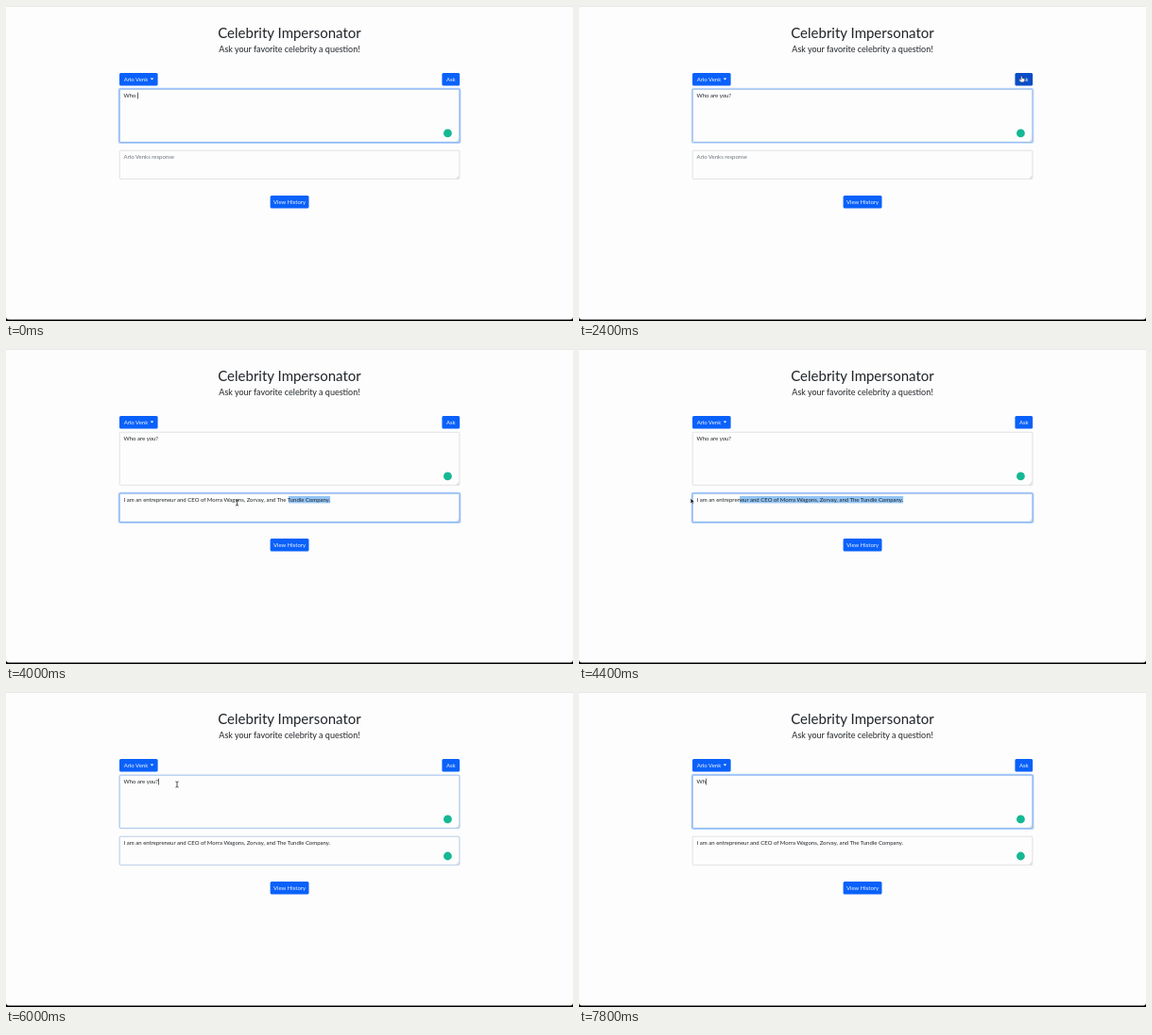
Write an HTML page that moves like this. It is 600x334 px and loops after 8 s.

```html
<!DOCTYPE html>
<html lang="en">
<head>
<meta charset="utf-8">
<title>Celebrity Impersonator</title>
<style>
  html, body { margin: 0; width: 100%; height: 100%; overflow: hidden; background: #000; }
  svg { display: block; width: 100vw; height: 100vh; }
  text { font: 6px Lato, "Open Sans", sans-serif; fill: #212529; white-space: pre; }
  .middle { text-anchor: middle; }
  .title { font-size: 15px; }
  .subtitle { font-size: 9px; }
  .button rect { fill: #0a61fa; }
  .button text { fill: #f1f6ff; }
  .button.dark rect { fill: #0a4dc6; }
  .box { fill: #fdfdfd; stroke: #cbcfd4; stroke-width: .6; }
  .ring { fill: none; stroke: #0d6efd; stroke-opacity: .32; stroke-width: 1.6; }
  .edge { fill: none; stroke: #7fb2f5; stroke-width: .7; }
  .grip { stroke: #999; stroke-width: .4; }
  .badge { fill: #15b894; }
</style>
</head>
<body>
<svg viewBox="0 0 600 334">
  <rect width="600" height="334"/>
  <rect y="-5" width="600" height="337.6" rx="3" fill="#fdfdfd"/>
  <rect width="600" height="1" fill="#e9e9e9"/>

  <text class="title middle" x="300" y="34.2">Celebrity Impersonator</text>
  <text class="subtitle middle" x="300" y="48.6">Ask your favorite celebrity a question!</text>

  <g class="button">
    <rect x="120" y="71" width="40.6" height="13.4" rx="1.5"/>
    <text x="124.7" y="79.7">Arlo Venk</text>
    <path d="M152.7 76.5h3.6l-1.8 1.9z" fill="#fff"/>
  </g>
  <g class="button" id="ask">
    <rect x="461.4" y="71" width="18.7" height="13.4" rx="1.5"/>
    <text class="middle" x="470.8" y="79.7">Ask</text>
  </g>
  <rect class="ring" id="askRing" x="460.7" y="70.3" width="20.1" height="14.8" rx="2"/>
  <g class="button">
    <rect x="279.6" y="201" width="40.9" height="13.4" rx="1.5"/>
    <text class="middle" x="300" y="209.8">View History</text>
  </g>

  <g id="fields"></g>
  <rect id="selection" y="156" height="7.4" fill="#93c4f4"/>
  <text id="question" x="124.6" y="97"></text>
  <text id="response" x="124.6" y="161.9"></text>
  <rect id="caret" y="91.7" width=".6" height="6.8"/>
  <circle class="badge" cx="467.4" cy="134.9" r="4.4"/>
  <circle class="badge" id="replyBadge" cx="467.4" cy="174" r="4.4"/>

  <g id="pointer" stroke-linejoin="round" stroke-linecap="round">
    <path data-shape="arrow" d="M0 0v5.2l1.3-1.1.8 1.8.9-.4-.8-1.8h1.6z" stroke="#fff" stroke-width=".4"/>
    <g data-shape="beam" fill="none">
      <path d="M-1.2-3q1.2 0 1.2.8 0-.8 1.2-.8M0-2.2v4.4M-1.2 3q1.2 0 1.2-.8 0 .8 1.2.8" stroke="#222" stroke-width=".75"/>
    </g>
    <path data-shape="hand" d="M-.8-2.8q.7-.7 1.2 0v1.9l2 .5q.7.3.5 1.1l-.5 2.5h-3.3l-2-2.5q0-.8.9-.5l1.2.7z" fill="#fff" stroke="#222" stroke-width=".4"/>
  </g>
</svg>
<script>
const LOOP = 8000, STEP = 200;
const QUESTION = "Who are you?";
const PLACEHOLDER = "Arlo Venks response";
const ANSWER = "I am an entrepreneur and CEO of Morra Wagons, Zorvay, and The Tundle Company.";

// time, x, y, shape
const PATH = [
  [1200, 446, 82, "arrow"], [1400, 465, 79, "hand"], [2400, 468.5, 77.5, "hand"],
  [2600, 468, 78, "hand"], [2800, 390, 130, "beam"], [3000, 281.5, 167, "beam"],
  [3400, 330, 164, "beam"], [3600, 338, 163, "beam"], [3800, 299, 163, "beam"],
  [4000, 244.5, 163, "beam"], [4200, 170, 161, "beam"], [4400, 118.2, 158.5, "arrow"],
  [5200, 118.2, 158.5, "arrow"], [5400, 135, 130, "beam"], [5800, 181, 98, "beam"],
  [6400, 181, 98, "beam"]
];

const $ = id => document.getElementById(id);
const within = (t, from, to) => t >= from && t < to;
const show = (node, visible) => node.setAttribute("visibility", visible ? "visible" : "hidden");

function field(id, y, height) {
  const rect = (name, grow) => `<rect class="${name}" x="${120.2 - grow}" y="${y - grow}"
    width="${359.7 + 2 * grow}" height="${height + 2 * grow}" rx="${1 + grow}"/>`;
  const bottom = y + height;
  return rect("box", 0) +
    `<g id="${id}">${rect("ring", .7)}${rect("edge", 0)}</g>` +
    `<path class="grip" d="M476.7 ${bottom - .5}l2.6-2.6M478.2 ${bottom - .5}l1.1-1.1"/>`;
}
$("fields").innerHTML = field("questionFocus", 88.2, 56.2) + field("responseFocus", 153.2, 30.2);

function pointerAt(t) {
  const i = PATH.findIndex(key => key[0] > t);
  if (i === 0) return null;
  const a = PATH.at(i < 0 ? -1 : i - 1), b = i < 0 ? a : PATH[i];
  if (i < 0 && t > a[0]) return null;
  const k = b === a ? 0 : (t - a[0]) / (b[0] - a[0]);
  return { x: a[1] + (b[1] - a[1]) * k, y: a[2] + (b[2] - a[2]) * k, shape: a[3] };
}

function typedText(t) {
  if (t < 6600) return QUESTION.slice(0, 4 + Math.round(t / 125));
  if (t < 7400) return QUESTION.slice(0, Math.max(0, 11 - Math.round((t - 6600) / 55)));
  return QUESTION.slice(0, (t - 7400) / STEP);
}

function setFocus(id, amount) {
  const [ring, edge] = $(id).children;
  ring.setAttribute("opacity", Math.max(0, amount * 1.5 - .5));
  edge.setAttribute("opacity", Math.min(1, amount * 2));
}

function draw(t) {
  const answered = t >= 2800;
  $("question").textContent = typedText(t);
  $("response").textContent = answered ? ANSWER : PLACEHOLDER;
  $("response").style.fill = answered ? "#212529" : "#6c757d";

  setFocus("questionFocus", t < 2400 || t >= 6200 ? 1 : t === 2400 ? .75 : t === 6000 ? .4 : 0);
  setFocus("responseFocus", within(t, 3600, 5800) ? 1 : within(t, 5800, 6200) ? .25 : 0);
  $("ask").classList.toggle("dark", within(t, 1400, 3600));
  show($("askRing"), within(t, 2600, 3600));
  show($("replyBadge"), t >= 4600);

  const blinkOn = t < 1200 || within(t, 1600, 2200) || t >= 6000;
  show($("caret"), blinkOn);
  $("caret").setAttribute("x", 124.9 + $("question").getComputedTextLength());

  // The highlight trails the pointer by one step.
  const selecting = within(t, 3800, 5800);
  show($("selection"), selecting);
  if (selecting) {
    const end = 124.6 + $("response").getComputedTextLength();
    const start = Math.min(end, Math.max(124.6, t > 4400 ? 0 : pointerAt(t - STEP).x));
    $("selection").setAttribute("x", start);
    $("selection").setAttribute("width", end - start);
  }

  const pointer = pointerAt(t);
  for (const shape of $("pointer").children) show(shape, pointer?.shape === shape.dataset.shape);
  if (pointer) $("pointer").setAttribute("transform", `translate(${pointer.x} ${pointer.y})`);
}

function tick() {
  draw(Math.floor(performance.now() % LOOP / STEP) * STEP);
  requestAnimationFrame(tick);
}
tick();
</script>
</body>
</html>
```
